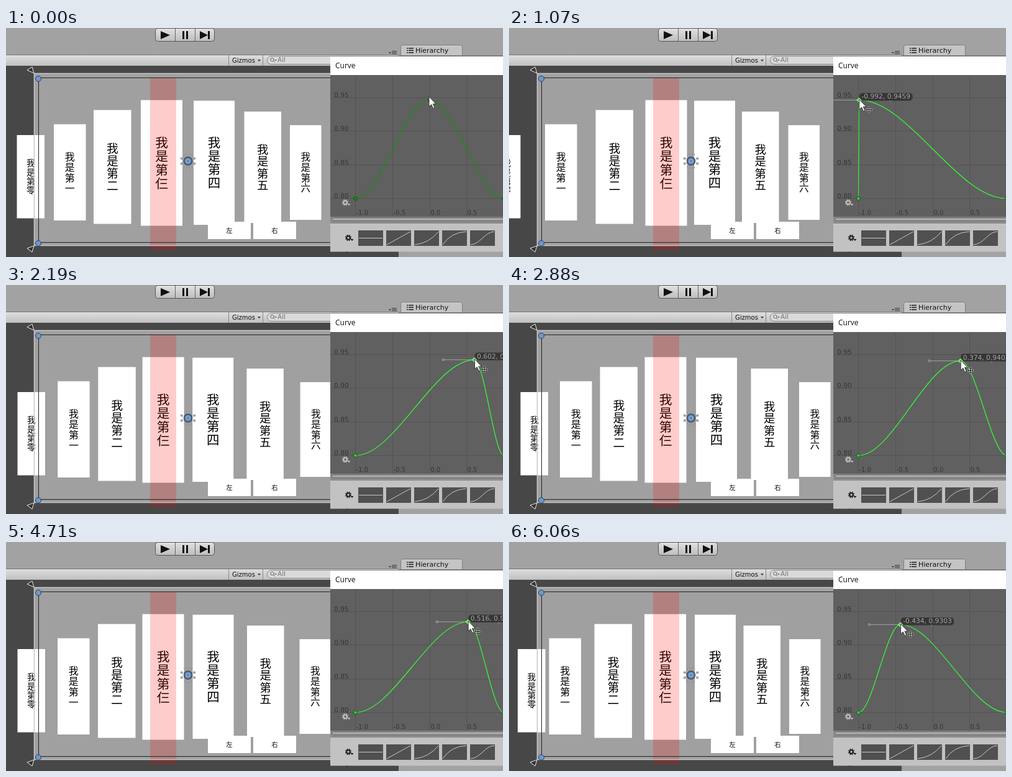
These frames come from a looping animation (800 px wide and 370 px high, 6140 ms). An HTML page with a canvas:

```html
<!DOCTYPE html>
<html lang="zh">
<head>
<meta charset="utf-8">
<title>Curve editor</title>
<style>
  html, body { margin: 0; width: 100%; height: 100%; overflow: hidden; background: #474747; }
  canvas { display: block; }
</style>
</head>
<body>
<canvas id="stage" width="800" height="370"></canvas>
<script>
const ctx = document.getElementById('stage').getContext('2d');
const LOOP = 6140;
const UI = '"DejaVu Sans", sans-serif';
const CJK = '"Noto Sans CJK SC", "Noto Sans CJK", sans-serif';

// Drags of the curve key: first and last update, intervals, path of [time, key x, key value].
const DRAGS = [
  [150, 1070, 12, [[73, 0, .9459], [690, -.52, .9459], [1070, -.992, .9459]]],
  [1240, 2340, 14, [[1160, -.992, .9459], [1633, -.126, .9459], [1800, .12, .9459], [2340, .8, .9403]]],
  [2640, 3680, 13, [[2560, .8, .9403], [2880, .374, .9403], [3190, -.33, .9403], [3680, -.917, .9403]]],
  [4080, 5340, 16, [[4000, -.917, .9403], [4300, -.4, .943], [4710, .516, .9344], [5340, .7, .9303]]],
  [5570, 6060, 6, [[5490, .7, .9303], [5750, .3, .9355], [6060, -.434, .9303]]]
];

// Key x, then the left edge of each card.
const LAYOUT = [
  [-.992, -26, 58, 139.5, 219.5, 298, 375, 449.5],
  [-.917, -24.5, 58, 139.5, 219.5, 298, 375, 449.5],
  [-.434, 14, 64.5, 137.5, 218, 299, 377.5, 451],
  [-.126, 17, 74.5, 139, 216.5, 301, 382, 455.5],
  [0, 17.5, 77, 141, 217, 302, 383.5, 457],
  [.374, 18.5, 82, 146.5, 218.5, 301, 389.5, 467],
  [.516, 18.5, 83, 148, 219.5, 300.5, 388, 472.5],
  [.8, 18.5, 83.5, 149, 220, 299.5, 386, 476]
];

// Top, width, height and last character of each card.
const CARDS = [
  [173, 44.5, 134.5, '零'], [155.5, 51.5, 155.5, '一'], [132.5, 60.5, 184, '二'],
  [116.5, 67, 203, '仨'], [117.5, 66, 200.5, '四'], [135, 59.5, 180, '五'], [157, 50.5, 153, '六']
];

// Interpolates a row of numbers by its first column.
function sample(rows, at) {
  const i = Math.max(1, rows.findIndex(r => r[0] >= at));
  const last = rows[rows.length - 1];
  if (at >= last[0]) return last;
  const [a, b] = [rows[i - 1], rows[i]];
  const u = Math.max(0, (at - a[0]) / (b[0] - a[0]));
  return a.map((v, n) => v + (b[n] - v) * u);
}

function keyAt(t) {
  const drag = DRAGS.filter(d => d[0] <= t).pop();
  if (!drag) return { x: 0, value: .9459, active: false };
  const [start, end, count, path] = drag;
  const step = (end - start) / count;
  const tick = Math.min(count, Math.floor((t - start + 1) / step));
  const [, x, value] = sample(path, start + tick * step);
  return { x, value, active: true };
}

function rect(x, y, w, h, fill) {
  ctx.fillStyle = fill;
  ctx.fillRect(x, y, w, h);
}

function paint(fill, stroke, width = 1) {
  if (fill) { ctx.fillStyle = fill; ctx.fill(); }
  if (stroke) { ctx.strokeStyle = stroke; ctx.lineWidth = width; ctx.stroke(); }
}

function poly(points, fill, stroke, width) {
  ctx.beginPath();
  points.forEach(([x, y]) => ctx.lineTo(x, y));
  ctx.closePath();
  paint(fill, stroke, width);
}

function line(x1, y1, x2, y2, color, width = 1) {
  ctx.beginPath();
  ctx.moveTo(x1, y1);
  ctx.lineTo(x2, y2);
  paint(null, color, width);
}

function round(x, y, w, h, r, fill, stroke) {
  ctx.beginPath();
  ctx.roundRect(x, y, w, h, r);
  paint(fill, stroke);
}

function circle(x, y, r, fill, stroke, width) {
  ctx.beginPath();
  ctx.arc(x, y, r, 0, Math.PI * 2);
  paint(fill, stroke, width);
}

function text(str, x, y, size, color, family = UI, align = 'left', base = 'alphabetic') {
  ctx.font = `${size}px ${family}`;
  ctx.fillStyle = color;
  ctx.textAlign = align;
  ctx.textBaseline = base;
  ctx.fillText(str, x, y);
}

function shade(y1, y2, top, bottom) {
  const g = ctx.createLinearGradient(0, y1, 0, y2);
  g.addColorStop(0, top);
  g.addColorStop(1, bottom);
  return g;
}

const diamond = (x, y, r, fill, stroke) =>
  poly([[x, y - r], [x + r, y], [x, y + r], [x - r, y]], fill, stroke);
const downArrow = (x, y, r, color) => poly([[x - r, y], [x + r, y], [x, y + r * 1.3]], color);

function rays(x, y, count, from, to, color, width) {
  for (let i = 0; i < count; i++) {
    const a = (i + .5) * 2 * Math.PI / count;
    const [c, s] = [Math.cos(a), Math.sin(a)];
    line(x + c * from, y + s * from, x + c * to, y + s * to, color, width);
  }
}

function gear(x, y, color) {
  rays(x, y, 8, 3, 5.2, color, 1.8);
  circle(x, y, 2.7, null, color, 2);
  downArrow(x + 6, y + 2, 2.5, color);
}

function drawToolbar() {
  rect(0, 0, 800, 44, '#a2a2a2');
  round(240.5, .5, 95, 21, 4, shade(0, 22, '#e2e2e2', '#bcbcbc'), '#555');
  for (const x of [272.5, 304.5]) line(x, 1, x, 21, '#666');
  poly([[249, 5], [264, 11.5], [249, 18]], '#111');
  rect(284, 5, 3, 13, '#111');
  rect(290, 5, 3, 13, '#111');
  poly([[312, 5], [325, 11.5], [312, 18]], '#111');
  rect(325, 5, 3, 13, '#111');

  rect(0, 44, 632, 17, shade(44, 61, '#dedede', '#c0c0c0'));
  line(0, 43.5, 632, 43.5, '#747474');
  for (const x of [358.5, 413.5]) line(x, 44, x, 61, '#8a8a8a');
  text('Gizmos', 364, 56, 10, '#111');
  downArrow(407.5, 51, 2.5, '#444');
  round(420.5, 45.5, 220, 13, 6.5, '#dadada', '#858585');
  circle(428.5, 51, 2.7, null, '#666');
  line(430.5, 53, 432.5, 55.5, '#666');
  downArrow(434, 51, 1.8, '#666');
  text('All', 437, 55, 10.5, '#777');

  downArrow(618, 39, 2, '#333');
  for (const y of [37.5, 39.5, 41.5]) line(621, y, 629, y, '#444');
  round(635.5, 27.5, 99, 22, 3, '#c4c4c4', '#7c7c7c');
  line(632, 44.5, 800, 44.5, '#808080');
  for (const y of [32.5, 36, 39.5]) {
    rect(645, y - .5, 2, 1.5, '#222');
    rect(648, y - .5, 8, 1.5, '#222');
  }
  text('Hierarchy', 659, 40, 11, '#111');
}

function drawScene(lefts) {
  rect(0, 61, 632, 309, '#474747');
  rect(632, 45, 168, 325, '#a2a2a2');
  rect(45, 73, 555, 279, '#a0a0a0');

  CARDS.forEach(([top, width, height, last], i) => {
    const left = lefts[i];
    rect(left, top, width, height, '#fff');
    [...'我是第' + last].forEach((char, n) =>
      text(char, left + width / 2, top + height / 2 + (n - 1.5) * height * .109,
        height * .102, '#000', CJK, 'center', 'middle'));
  });
  [['左', 325], ['右', 398]].forEach(([label, x]) => {
    rect(x, 313, 69, 28, '#fff');
    text(label, x + 34.5, 327, 10.5, '#111', CJK, 'center', 'middle');
  });
  rect(232, 81, 42, 278, 'rgba(255,0,0,.2)');

  ctx.strokeStyle = '#c6c6c6';
  ctx.lineWidth = 1.5;
  ctx.strokeRect(45.5, 73.5, 600, 278);
  ctx.strokeStyle = '#222';
  ctx.lineWidth = 1;
  ctx.strokeRect(52.5, 80.5, 600, 266);
  for (const y of [82, 348]) circle(52, y, 4.5, '#6f97cc', '#2b3d58');
  poly([[34, 68], [42, 63], [45, 73]], '#333', '#eee');
  poly([[34, 356], [42, 362], [45, 352]], '#333', '#eee');
  poly([[545, 358], [558, 358], [548, 363]], '#222');

  rays(293, 215, 8, 9, 13, '#777', 3);
  rays(293, 215, 8, 9, 13, '#c8c8c8', 1.2);
  circle(293, 215, 6.5, '#5f86b6', '#3d4a5c', 1.5);
  circle(293, 215, 3, null, '#a5bcd8');
}

function drawPresets() {
  const shapes = [[0, .5, 1, .5, .5, .5], [0, 0, .33, .33, 1, 1], [0, 0, .5, 0, 1, 1],
    [0, 0, .25, .75, 1, 1], [0, 0, .4, 0, 1, 1]];
  gear(551, 339, '#222');
  shapes.forEach((s, i) => {
    const x = 567 + i * 45;
    const [px, py] = [v => x + 1 + v * 38, v => 350 - v * 21];
    rect(x, 327, 40, 25, '#505050');
    ctx.beginPath();
    ctx.moveTo(px(0), py(s[1]));
    if (i === 0) ctx.lineTo(px(1), py(.5));
    else if (i === 1) ctx.lineTo(px(1), py(1));
    else if (i === 4) ctx.bezierCurveTo(px(.4), py(0), px(.6), py(1), px(1), py(1));
    else ctx.quadraticCurveTo(px(i === 2 ? .6 : .35), py(i === 2 ? .1 : .95), px(1), py(1));
    paint(null, '#c8c8c8');
  });
}

function drawCursor(x, y, moving) {
  const shape = [[0, 0], [0, 16], [3.7, 12.6], [6.6, 19], [9, 18], [6.2, 11.7], [11, 11.7]];
  poly(shape.map(([dx, dy]) => [x + dx, y + dy]), '#fff', '#222', .8);
  if (!moving) return;
  const [cx, cy] = [x + 15.5, y + 16.5];
  for (const [color, width, r] of [['#fff', 3, 5], ['#111', 1.2, 4]]) {
    line(cx - r, cy, cx + r, cy, color, width);
    line(cx, cy - r, cx, cy + r, color, width);
  }
  for (const [dx, dy] of [[1, 0], [-1, 0], [0, 1], [0, -1]]) {
    const [bx, by] = [cx + dx * 3, cy + dy * 3];
    poly([[cx + dx * 5, cy + dy * 5], [bx + dy * 2, by + dx * 2], [bx - dy * 2, by - dx * 2]], '#111');
  }
}

function drawCurveWindow(key) {
  const px = v => 682 + v * 119.5;
  const py = v => 275.5 - (v - .8) * 1090;
  ctx.save();
  ctx.beginPath();
  ctx.rect(522, 45, 278, 316.5);
  ctx.clip();
  rect(522, 45, 278, 317, '#c2c2c2');
  rect(522, 46, 278, 30, '#fff');
  text('Curve', 530, 65, 12, '#111', '"Open Sans", sans-serif');
  rect(522, 76, 278, 229, '#606060');

  for (const v of [-1, -.5, 0, .5]) {
    const x = Math.floor(px(v)) + .5;
    line(x, 76, x, 305, '#535353');
    text(v.toFixed(1), x + 1, 302, 10, '#363636');
  }
  for (const v of [.95, .9, .85, .8]) {
    const y = Math.floor(py(v)) + .5;
    line(522, y, 800, y, '#535353');
    text(v.toFixed(2), 528, y - 1, 10.7, '#363636');
  }
  gear(546, 282, '#bcbcbc');
  rect(522, 305, 278, 11, '#8c8c8c');
  round(524.5, 306.5, 290, 5, 2.5, '#a6a6a6', '#686868');
  drawPresets();

  const [kx, ky, base] = [px(key.x), py(key.value), py(.8)];
  const color = key.active ? '#3f3' : '#0b950b';
  ctx.beginPath();
  ctx.moveTo(px(-1), base);
  let [x, y] = [px(-1), base];
  for (const [nx, ny] of [[kx, ky], [px(1), base]]) {
    const third = (nx - x) / 3;
    ctx.bezierCurveTo(x + third, y, nx - third, ny, nx, ny);
    [x, y] = [nx, ny];
  }
  paint(null, color, 1.2);
  diamond(px(-1), base, 3.5, key.active ? '#2bd42b' : '#0b950b', '#154015');
  diamond(px(1), base, 3.5, key.active ? '#2bd42b' : '#0b950b', '#154015');

  if (key.active) {
    line(kx - 50, ky, kx + 50, ky, '#a0a0a0');
    for (const dx of [-50, 50]) diamond(kx + dx, ky, 2, '#666', '#bbb');
    const label = `${key.x.toFixed(3)}, ${key.value.toFixed(4)}`;
    ctx.font = `10.7px ${UI}`;
    round(kx + .5, ky - 11.5, ctx.measureText(label).width + 7, 12.5, 5, 'rgba(52,50,50,.93)');
    text(label, kx + 4, ky - 2, 10.7, '#a6a6a6');
  }
  diamond(kx, ky, 3.5, color, key.active ? '#c8f5c8' : '#154015');
  ctx.restore();
  line(522, 45.5, 800, 45.5, '#777');
  drawCursor(key.active ? kx + .5 : 681, key.active ? ky - 1 : 111, key.active);
}

function frame(now) {
  const key = keyAt(now % LOOP);
  drawToolbar();
  drawScene(sample(LAYOUT, key.x).slice(1));
  drawCurveWindow(key);
  requestAnimationFrame(frame);
}
frame(performance.now());
</script>
</body>
</html>
```
